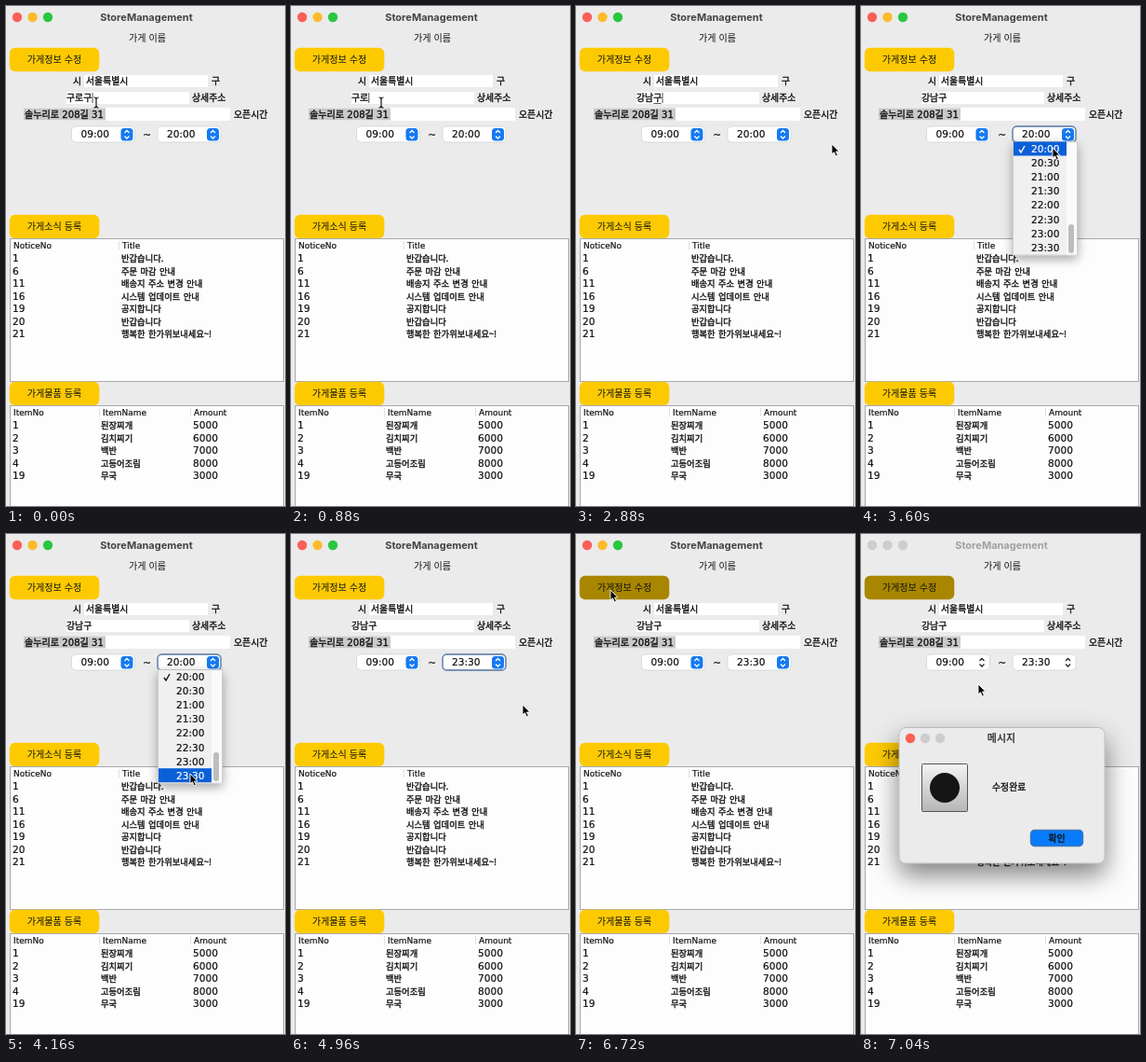
Animation, 300 px wide and 536 px high, one loop 7120 ms. Source, as an HTML page:

```html
<!DOCTYPE html>
<html lang="ko">
<head>
<meta charset="utf-8">
<title>StoreManagement</title>
<style>
html, body { margin: 0; width: 100%; height: 100%; overflow: hidden; background: #ebebeb; }
svg { display: block; }
text { white-space: pre; stroke: currentColor; stroke-width: 0; }
.ko { font: 10.1px "Noto Sans CJK KR", "Noto Sans CJK", sans-serif; }
.label { font: 9.9px "Noto Sans CJK KR", "Noto Sans CJK", sans-serif; stroke-width: .35px; }
.cell { font: 9.3px "Noto Sans CJK KR", "Noto Sans CJK", sans-serif; word-spacing: .8px; stroke-width: .35px; }
.num { font: 10.6px "DejaVu Sans", "Noto Sans CJK KR", sans-serif; stroke-width: .2px; }
.addr { font: 10.1px "DejaVu Sans", "Noto Sans CJK KR", "Noto Sans CJK", sans-serif; stroke-width: .35px; }
.head { font: 9px "DejaVu Sans", sans-serif; stroke-width: .2px; }
.title { font: 700 11px Inter, "Noto Sans CJK KR", sans-serif; }
.mid { text-anchor: middle; }
</style>
</head>
<body>
<svg id="stage" width="300" height="536" viewBox="0 0 300 536"></svg>
<script>
const LOOP = 7120, STEP = 80;
const OPEN = 3440, CLOSE = 4320, PRESS = 6560, DIALOG = 6880;
const stage = document.getElementById('stage');

// time, x, y of the pointer
const path = [
  [0, 97, 103], [2600, 97, 103], [2720, 200, 130], [2880, 275, 148], [3040, 266, 148],
  [3280, 221, 138], [3440, 221, 138], [3600, 206, 152], [4000, 199, 247], [4160, 198, 257],
  [4400, 198, 257], [4640, 235, 210], [4880, 249, 183], [4960, 249, 183], [5160, 290, 160],
  [5440, 110, 80], [5600, 60, 64], [6160, 40, 62], [6400, 37, 60], [6720, 37, 60],
  [7040, 126, 161], [LOOP, 126, 161]
];
// time, committed text, syllable being composed
const typing = [
  [0, '구로구', ''], [720, '구로', ''], [960, '구', ''], [1200, '', ''],
  [1440, '', 'ㄱ'], [1520, '', '가'], [1680, '', '강'], [1920, '강', 'ㄴ'],
  [2000, '강', '나'], [2160, '강', '남'], [2320, '강남', 'ㄱ'], [2480, '강남', '구'],
  [OPEN, '강남구', '']
];
const notices = [[1, '반갑습니다.'], [6, '주문 마감 안내'], [11, '배송지 주소 변경 안내'],
  [16, '시스템 업데이트 안내'], [19, '공지합니다'], [20, '반갑습니다'], [21, '행복한 한가위보내세요~!']];
const items = [[1, '된장찌개', 5000], [2, '김치찌기', 6000], [3, '백반', 7000],
  [4, '고등어조림', 8000], [19, '무국', 3000]];
const times = ['20:00', '20:30', '21:00', '21:30', '22:00', '22:30', '23:00', '23:30'];

const text = (x, y, s, cls = 'label', fill = '#111') =>
  `<text x="${x}" y="${y}" class="${cls}" fill="${fill}" color="${fill}">${s}</text>`;
const rect = (x, y, w, h, fill, more = '') =>
  `<rect x="${x}" y="${y}" width="${w}" height="${h}" fill="${fill}" ${more}/>`;
const lights = (x, y, gap, colors) =>
  colors.map((c, i) => `<circle cx="${x + gap * i}" cy="${y}" r="5.2" fill="${c}"/>`).join('');
const button = (y, label, fill = '#fdca02') =>
  rect(3.8, y - .2, 96.5, 25.4, fill, 'rx="6"') + text(52, y + 16, label, 'ko mid');

function pointer(t) {
  const i = path.findIndex(p => p[0] > t);
  const [t0, x0, y0] = path[i - 1], [t1, x1, y1] = path[i];
  const k = (t - t0) / (t1 - t0);
  return [x0 + (x1 - x0) * k, y0 + (y1 - y0) * k];
}

function combo(x, value, active, focused) {
  const ink = active ? '#fff' : '#222';
  return rect(x, 129, 68, 17, '#fff', focused
      ? 'rx="4.5" stroke="#7893b5" stroke-width="1.8"'
      : 'rx="4.5" stroke="#cfcfcf" stroke-width=".7"') +
    text(x + 10, 141, value, 'num') +
    (active ? rect(x + 53, 131, 13, 13.5, '#1479f4', 'rx="3.5"') : '') +
    `<path d="M${x + 57} 136l2.5-2.5 2.5 2.5m-5 3.5l2.5 2.5 2.5-2.5" fill="none" stroke="${ink}" stroke-width="1.3"/>`;
}

function table(y, h, heads, rows, cols) {
  return rect(4.5, y + .5, 294, h, '#fdfdfd', 'stroke="#a9a9a9"') +
    heads.map(([x, s]) => text(x, y + 11, s, 'head')).join('') +
    heads.slice(1).map(([x]) => rect(x - 4, y + 3, .7, 9, '#d5d5d5')).join('') +
    rows.map((row, r) => row.map((v, c) =>
      text(cols[c], y + 25 + 13.5 * r, v, typeof v === 'number' ? 'num' : 'cell')).join('')).join('');
}

function districtField(t) {
  const [, done, part] = typing.findLast(s => s[0] <= t);
  const w = 9.2, start = 65 + done.length * w, end = start + part.length * w;
  return rect(65, 92, 132, 13, '#fff') + text(65, 102, done + part) +
    (part ? rect(start, 104, w - 1, .8, '#333') : '') +
    (t < OPEN ? rect(end, 93, .8, 11, '#222') : '');
}

function popup(y) {
  const hot = Math.max(0, Math.min(7, Math.floor((y - 145) / 15.1)));
  return rect(163.5, 145.5, 69, 121.5, '#f0f0f0', 'stroke="#c4c4c4" stroke-width=".7" filter="url(#soft)"') +
    rect(221, 146, 11, 120.5, '#fafafa') +
    rect(164, 145.5 + 15.1 * hot, 57, 15, '#0b60d8') +
    times.map((s, i) => text(183, 157 + 15.1 * i, s, 'num', i === hot ? '#fff' : '#111')).join('') +
    `<path d="M170 154l2 3 4-7" fill="none" stroke="${hot ? '#111' : '#fff'}" stroke-width="1.4"/>` +
    rect(223, 234, 6, 31, '#bdbdbd', 'rx="3"');
}

function dialog() {
  return rect(41, 207.5, 221, 145.5, '#ebebeb', 'rx="7" stroke="#aaa" stroke-width=".7" filter="url(#shadow)"') +
    lights(53, 219, 16, ['#fb5f57', '#cdcdcd', '#cdcdcd']) +
    text(151, 223, '메시지', 'title mid', '#3c3c3c') +
    rect(65.5, 246.5, 49, 51, 'url(#metal)', 'rx="1" stroke="#555"') +
    '<circle cx="90" cy="272" r="16" fill="#151515"/>' +
    text(141, 275, '수정완료') +
    rect(182.5, 317.5, 56, 17, '#077bfa', 'rx="4" stroke="#3f77b8" stroke-width="1.4"') +
    text(210.5, 329.5, '확인', 'label mid');
}

function cursor(t, x, y) {
  if (t < 2640) {
    const bar = `M${x - 2.5} ${y - 5}q2.5 0 2.5 2v7q0 2-2.5 2m5-11q-2.5 0-2.5 2v7q0 2 2.5 2`;
    return `<path d="${bar}" fill="none" stroke="#fff" stroke-width="2.2"/>` +
      `<path d="${bar}" fill="none" stroke="#111" stroke-width="1.2"/>`;
  }
  return `<path transform="translate(${x} ${y})" d="M0 0v11l2.5-2.3 1.9 4.3 2-.9-1.9-4.1h3.5z"
    fill="#000" stroke="#fff" stroke-width=".9"/>`;
}

const defs = `<defs>
  <linearGradient id="metal" x2="0" y2="1"><stop stop-color="#f4f4f4"/><stop offset="1" stop-color="#b5b5b5"/></linearGradient>
  <filter id="soft" x="-50%" y="-30%" width="200%" height="160%"><feDropShadow dx="0" dy="4" stdDeviation="6" flood-opacity=".35"/></filter>
  <filter id="shadow" x="-30%" y="-40%" width="160%" height="200%"><feDropShadow dx="0" dy="12" stdDeviation="14" flood-opacity=".5"/></filter>
</defs>`;

function draw(t) {
  const [x, y] = pointer(t), active = t < DIALOG;
  stage.innerHTML = defs + rect(0, 0, 300, 536, '#ebebeb') +
    lights(12, 12, 16.5, active ? ['#fb5f57', '#fcbb2d', '#29c73f'] : Array(3).fill('#cdcdcd')) +
    text(151, 15.5, 'StoreManagement', 'title mid', active ? '#444' : '#a0a0a0') +
    text(152, 38, '가게 이름', 'ko mid') +
    button(45, '가게정보 수정', t < PRESS ? undefined : '#a88600') +
    text(72, 84, '시') + rect(84, 74, 133, 13, '#fff') + text(86, 84, '서울특별시') + text(221, 84, '구') +
    districtField(t) + text(200, 102, '상세주소') +
    rect(19, 109, 222, 14, '#fff') + rect(19, 109.5, 88, 13, '#c9c9c9') +
    text(20, 120, '솔누리로 208길 31', 'addr') + text(245, 120, '오픈시간') +
    combo(70.5, '09:00', active, false) + text(147.3, 142, '~', 'num') +
    combo(163, t < CLOSE ? '20:00' : '23:30', active, t >= OPEN && t < PRESS) +
    button(224, '가게소식 등록') +
    table(249, 153, [[8, 'NoticeNo'], [125, 'Title']], notices, [7, 124]) +
    button(403, '가게물품 등록') +
    table(428, 120, [[8, 'ItemNo'], [104, 'ItemName'], [202, 'Amount']], items, [7, 102, 201]) +
    (t >= OPEN && t < CLOSE ? popup(y) : '') +
    (active ? '' : dialog()) +
    cursor(t, x, y);
}

const begin = performance.now();
let last = -1;
function tick() {
  const t = Math.floor((performance.now() - begin) % LOOP / STEP) * STEP;
  if (t !== last) draw(last = t);
  requestAnimationFrame(tick);
}
tick();
</script>
</body>
</html>
```
